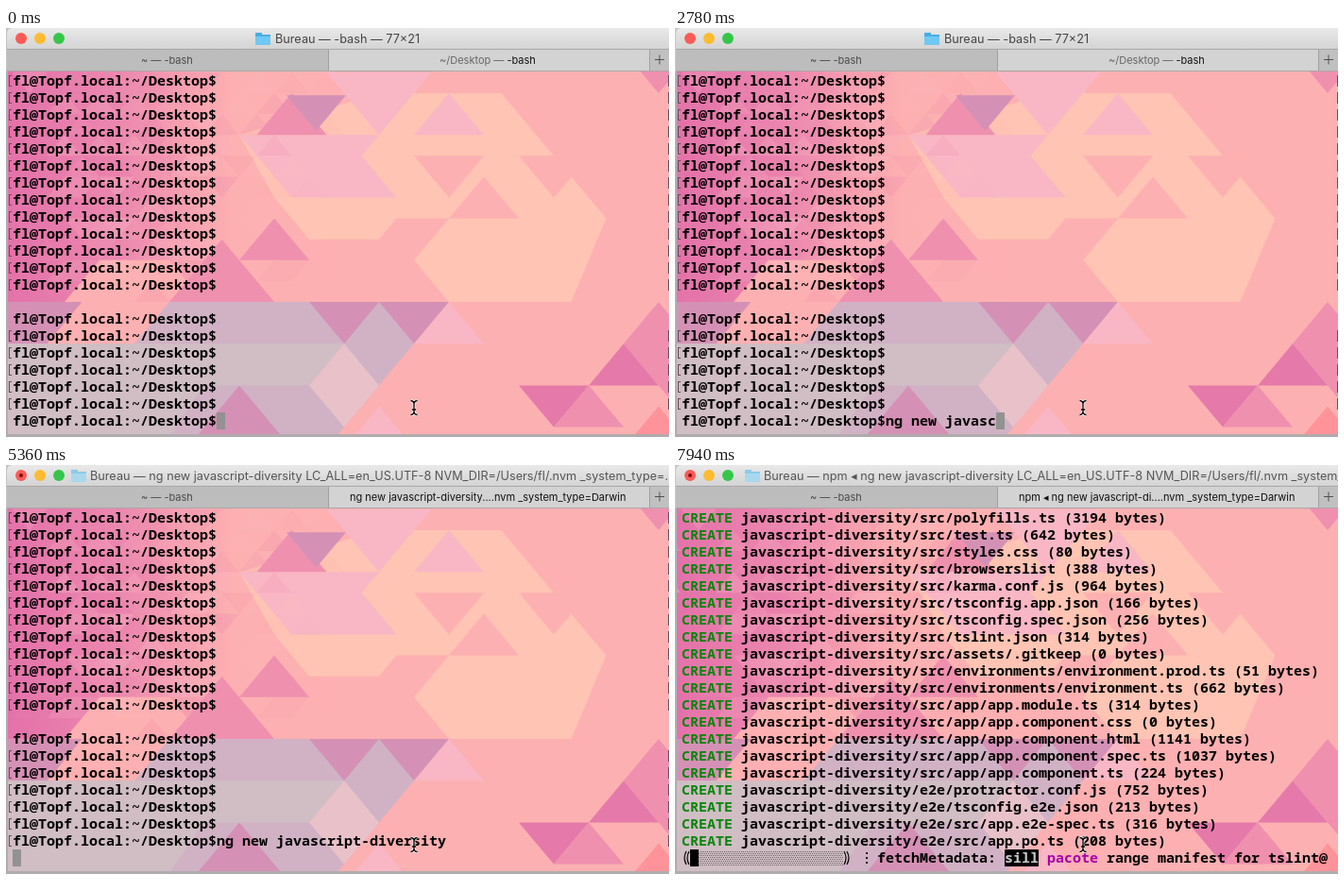
An HTML page with a canvas that plays this animation: 702 by 433 pixels, repeating every 8 s.

```html
<!DOCTYPE html>
<html lang="en">
<head>
<meta charset="utf-8">
<title>Terminal</title>
<style>
html, body { margin: 0; width: 100%; height: 100%; overflow: hidden; }
canvas { display: block; width: 702px; height: 433px; }
</style>
</head>
<body>
<canvas id="stage" width="702" height="433"></canvas>
<script>
const ctx = document.getElementById('stage').getContext('2d');
const LOOP = 8000, CELL = 9, ROW = 18, LEFT = 7, TOP = 47, COLS = 76;
const MONO = "bold 15px 'Noto Sans Mono', 'DejaVu Sans Mono', monospace";
const UI = 'Inter, Roboto, sans-serif';

const PROMPT = 'fl@Topf.local:~/Desktop$';
const ENTER = 5310, RETITLE = 5360, CREATED = 6560, NPM = 6680, PROGRESS = 7280, FETCH = 7520;

// Keys come in short bursts, each with its start time.
const KEY_GAP = 93;
const BURSTS = {
  120: 'n', 330: 'g ', 980: 'new', 1760: ' ', 2120: 'j', 2300: 'avas', 2780: 'c', 2960: 'ri',
  3190: 'pt', 3490: '-', 3840: 'di', 4140: 'versit', 4830: 'y'
};

const FILES = `src/polyfills.ts (3194
src/test.ts (642
src/styles.css (80
src/browserslist (388
src/karma.conf.js (964
src/tsconfig.app.json (166
src/tsconfig.spec.json (256
src/tslint.json (314
src/assets/.gitkeep (0
src/environments/environment.prod.ts (51
src/environments/environment.ts (662
src/app/app.module.ts (314
src/app/app.component.css (0
src/app/app.component.html (1141
src/app/app.component.spec.ts (1037
src/app/app.component.ts (224
e2e/protractor.conf.js (752
e2e/tsconfig.e2e.json (213
e2e/src/app.e2e-spec.ts (316
e2e/src/app.po.ts (208`.split('\n');
const PACKAGES = ['@types/node@', 'codelyzer@', 'karma@~1', 'protractor@', 'ts-node@', 'tslint@'];
const SPINNER = '⠋⠙⠹⠸⠼⠴⠦⠧⠇⠏';

const SALMON = '#fdb0b1', PEACH = '#ffc4b3', PALE = '#f9b7c5', PINK = '#ef90af', HOT = '#e57aaa',
  MAUVE = '#d591b5', LAVENDER = '#d1b2c5', GREY = '#d0bec4', BLUSH = '#e9c2c9';

function box(x, y, w, h, color) {
  ctx.fillStyle = color;
  ctx.fillRect(x, y, w, h);
}

function disc(x, y, r, color) {
  ctx.fillStyle = color;
  ctx.beginPath();
  ctx.arc(x, y, r, 0, Math.PI * 2);
  ctx.fill();
}

function label(text, x, y, font, color) {
  ctx.font = font;
  ctx.fillStyle = color;
  ctx.fillText(text, x, y);
}

function put(text, col, row, color = '#000') {
  label(text, LEFT + col * CELL, TOP + row * ROW + 14, MONO, color);
}

function block(col, row, color = '#929292', cells = 1) {
  box(LEFT + col * CELL, TOP + row * ROW, CELL * cells, ROW, color);
}

function randomizer(seed) {
  return () => (seed = seed * 16807 % 2147483647) / 2147483647;
}

// Points on the wallpaper's triangular lattice.
function shape(color, ...points) {
  ctx.fillStyle = color;
  ctx.beginPath();
  for (const [col, row] of points) ctx.lineTo(395 + 18.5 * col, 290 + 22.1 * row);
  ctx.fill();
}

// Triangle by its apex; a negative size points down.
function facet(color, col, row, size) {
  shape(color, [col, row], [col + size, row + size], [col - size, row + size]);
}

// Random translucent facets, dense on the left and gone by the middle.
function scatter() {
  const random = randomizer(29);
  for (let row = -12; row < 0; row++) {
    for (let col = -22 + row % 2; col < -2; col += 2) {
      const strength = 0.4 * Math.min(1, (-2 - col) / 10);
      const size = random() < 0.5 ? 1 : -1;
      ctx.globalAlpha = strength * random();
      facet(random() < 0.5 ? PALE : HOT, col, row, size);
    }
  }
  ctx.globalAlpha = 1;
}

function wallpaper() {
  ctx.save();
  ctx.beginPath();
  ctx.rect(2, 46, 700, 384);
  ctx.clip();
  box(0, 46, 702, 387, SALMON);

  const pink = ctx.createLinearGradient(0, 0, 240, 0);
  pink.addColorStop(0, '#e371a9');
  pink.addColorStop(0.5, '#ec88af');
  pink.addColorStop(1, SALMON);
  shape(pink, [-22, -12], [-8, -12], [-8, -2], [-16, -2], [-18, 0], [-22, 0]);

  shape(PEACH, [-8, -8], [0, -10], [7, -10], [10, -7], [12, -5], [13, -4], [11, 0], [4, 0], [2, -2],
    [4, -4], [1, -4], [0, -3], [-4, -3], [-6, -5]);
  shape(PALE, [-8, -8], [0, -8], [-1, -7], [1, -5], [-5, -5]);
  scatter();

  facet(PALE, 0, -8, -3);
  facet(PALE, 4, -10, 2);
  facet(PINK, -5, -10, 2);
  facet(MAUVE, -3.6, -8.2, -1.7);
  facet(SALMON, 4, -5, -2);
  facet(SALMON, 6, -6, 2);
  facet(SALMON, 10, -5, -2);
  facet(PINK, -6, -4, 2);
  facet(PINK, -9, -3, 3);

  shape(MAUVE, [-22, 0], [-17, 0], [-19, 2], [-22, 2]);
  shape(LAVENDER, [-12, 0], [4, 0], [-2.4, 6.4], [-22, 6.4], [-22, 2], [-14, 2]);
  shape(GREY, [-22, 2], [-2, 2], [-4, 4], [-10, 4], [-12, 6.4], [-22, 6.4]);
  for (const col of [-2, 2]) facet(MAUVE, col, 2, -2);
  facet(MAUVE, -8, 4, 2.4);
  shape(BLUSH, [-2, 2], [0, 4], [-2, 6], [-4, 4]);
  facet(PALE, 4, 0, 2);
  facet(PALE, 0, 5, 1.4);

  facet(PINK, 16, -10, -2);
  shape(PINK, [16, 0], [18, 2], [18, 6], [14, 2]);
  facet(HOT, 14, 2, 2);
  facet(HOT, 10, 6, -2);
  facet(PINK, 12, 4, 2);
  facet('#ff9399', 16, 5, 1.4);
  ctx.restore();
}

function folder(x, color, lid) {
  box(x, 5, 7, 4, lid);
  box(x, 7, 16, 11, lid);
  box(x, 9, 16, 9, color);
}

function chrome(t) {
  const running = t >= RETITLE, npm = t >= NPM;
  box(0, 0, 702, 46, '#c4c4c4');
  const bar = ctx.createLinearGradient(0, 0, 0, 23);
  bar.addColorStop(0, '#e9e9e9');
  bar.addColorStop(1, '#d3d3d3');
  ctx.fillStyle = bar;
  ctx.beginPath();
  ctx.moveTo(1, 23);
  ctx.lineTo(1, 6);
  ctx.quadraticCurveTo(1, 0, 7, 0);
  ctx.lineTo(702, 0);
  ctx.lineTo(702, 23);
  ctx.fill();

  box(1, 23, 340, 22, '#bdbdbd');
  box(342, 23, 339, 22, '#d3d3d3');
  box(682, 23, 20, 22, '#c0c0c0');
  for (const y of [22, 45]) box(1, y, 701, 1, '#a8a8a8');
  for (const x of [341, 681]) box(x, 23, 1, 22, '#a0a0a0');
  box(687, 33, 10, 1, '#505050');
  box(691.5, 28.5, 1, 10, '#505050');

  ['#fb5b57', '#fcbb30', '#35c649'].forEach((color, i) => disc(16 + 20 * i, 11, 6, color));
  if (running) disc(16, 11, 2, '#7a0808');

  const titleFont = '12.7px ' + UI, tabFont = '11px ' + UI;
  if (!running) {
    folder(264, '#70c8f3', '#48aee2');
    label('Bureau — -bash — 77×21', 285, 16, titleFont, '#444');
    label('~/Desktop — ', 459, 38, tabFont, '#666');
    label('-bash', 459 + ctx.measureText('~/Desktop — ').width, 38, tabFont, '#111');
  } else {
    const x = npm ? 74 : 69;
    folder(x, '#a8d8ee', '#8ccbe8');
    const tail = 'ng new javascript-diversity LC_ALL=en_US.UTF-8 NVM_DIR=/Users/fl/.nvm _system_';
    const title = npm ? 'npm ◂ ' + tail + '...' : tail + 'type=...';
    label('Bureau — ' + title, x + 20, 16, titleFont, '#555');
    const tab = npm ? 'npm ◂ ng new javascript-di' : 'ng new javascript-diversity';
    label(tab + '....nvm _system_type=Darwin', 364, 38, tabFont, '#111');
  }
  label('~ — -bash', 143, 38, tabFont, '#4a4a4a');
}

function promptMarks(row) {
  const y = TOP + row * ROW + 3, color = '#6a4a58';
  for (const x of [3, 701]) box(x, y, 1, 12, color);
  for (const dy of [0, 11]) box(3, y + dy, 3, 1, color);
}

function typedText(t) {
  let text = '';
  for (const [start, keys] of Object.entries(BURSTS)) {
    if (t >= start) text += keys.slice(0, 1 + Math.floor((t - start) / KEY_GAP));
  }
  return text;
}

function shell(t) {
  const scrolled = t >= ENTER ? 1 : 0;
  for (let line = scrolled; line <= 20; line++) {
    if (line === 13) continue;
    const row = line - scrolled;
    put(PROMPT, 0, row);
    if (line !== 14 && (line < 20 || scrolled)) promptMarks(row);
  }
  const typed = typedText(t);
  put(typed, PROMPT.length, 20 - scrolled);
  block(scrolled ? 0 : PROMPT.length + typed.length, 20);
}

function bracket(x, flip) {
  ctx.strokeStyle = '#000';
  ctx.lineWidth = 1.2;
  for (const dx of [0, 3]) {
    ctx.beginPath();
    ctx.moveTo(x + dx + flip * 2, 409);
    ctx.quadraticCurveTo(x + dx - flip * 2, 416, x + dx + flip * 2, 423);
    ctx.stroke();
  }
}

function spinner(char) {
  const bits = char.charCodeAt(0) - 0x2800;
  for (let b = 0; b < 6; b++) {
    if (bits >> b & 1) box(202 + 4 * Math.floor(b / 3), 410 + 5 * (b % 3), 2, 2, '#000');
  }
}

function progress(t) {
  const fetching = t >= FETCH;
  const step = Math.min(5, Math.floor((t - FETCH) / 84));
  bracket(10, 1);
  bracket(181, -1);
  for (let y = 409; y < 424; y += 2) {
    for (let x = 16 + (y >> 1) % 2; x < 178; x += 2) box(x, y, 1, 1, 'rgba(0,0,0,.5)');
  }
  if (fetching) block(1, 20, '#000');
  spinner(SPINNER[fetching ? 3 + step : 0]);

  const parts = fetching
    ? [['fetchMetadata:', '#000'], ['sill', '#c8c8c8', '#000'], ['pacote', '#a800a8'],
       ['range manifest for ' + PACKAGES[step], '#000']]
    : [['rollbackFailedOptional:', '#000'], ['verb', '#5c5cff', '#000'], ['npm-session', '#a800a8'],
       ['5d1e07a94c2b', '#000']];
  let col = 23;
  for (const [text, color, back] of parts) {
    if (back) block(col, 20, back, text.length);
    put(text.slice(0, COLS - col), col, 20, color);
    col += text.length + 1;
  }
}

function listing(t) {
  FILES.forEach((file, row) => {
    put('CREATE', 0, row, '#08860c');
    put('javascript-diversity/' + file + ' bytes)', 7, row);
  });
  if (t >= PROGRESS) progress(t);
  else block(0, 20);
}

function pointer() {
  for (const [width, color] of [[3, 'rgba(255,255,255,.75)'], [1.3, '#000']]) {
    ctx.strokeStyle = color;
    ctx.lineWidth = width;
    ctx.beginPath();
    for (const side of [-3.5, 3.5]) {
      ctx.moveTo(432 + side, 394.5);
      ctx.quadraticCurveTo(432, 395, 432, 398);
      ctx.lineTo(432, 406);
      ctx.quadraticCurveTo(432, 409, 432 + side, 409.5);
    }
    ctx.moveTo(430, 404);
    ctx.lineTo(434, 404);
    ctx.stroke();
  }
}

function frame(now) {
  const t = now % LOOP;
  box(0, 0, 702, 433, '#b0acae');
  wallpaper();
  chrome(t);
  if (t < CREATED) shell(t);
  else listing(t);
  pointer();
  requestAnimationFrame(frame);
}
frame(0);
</script>
</body>
</html>
```
